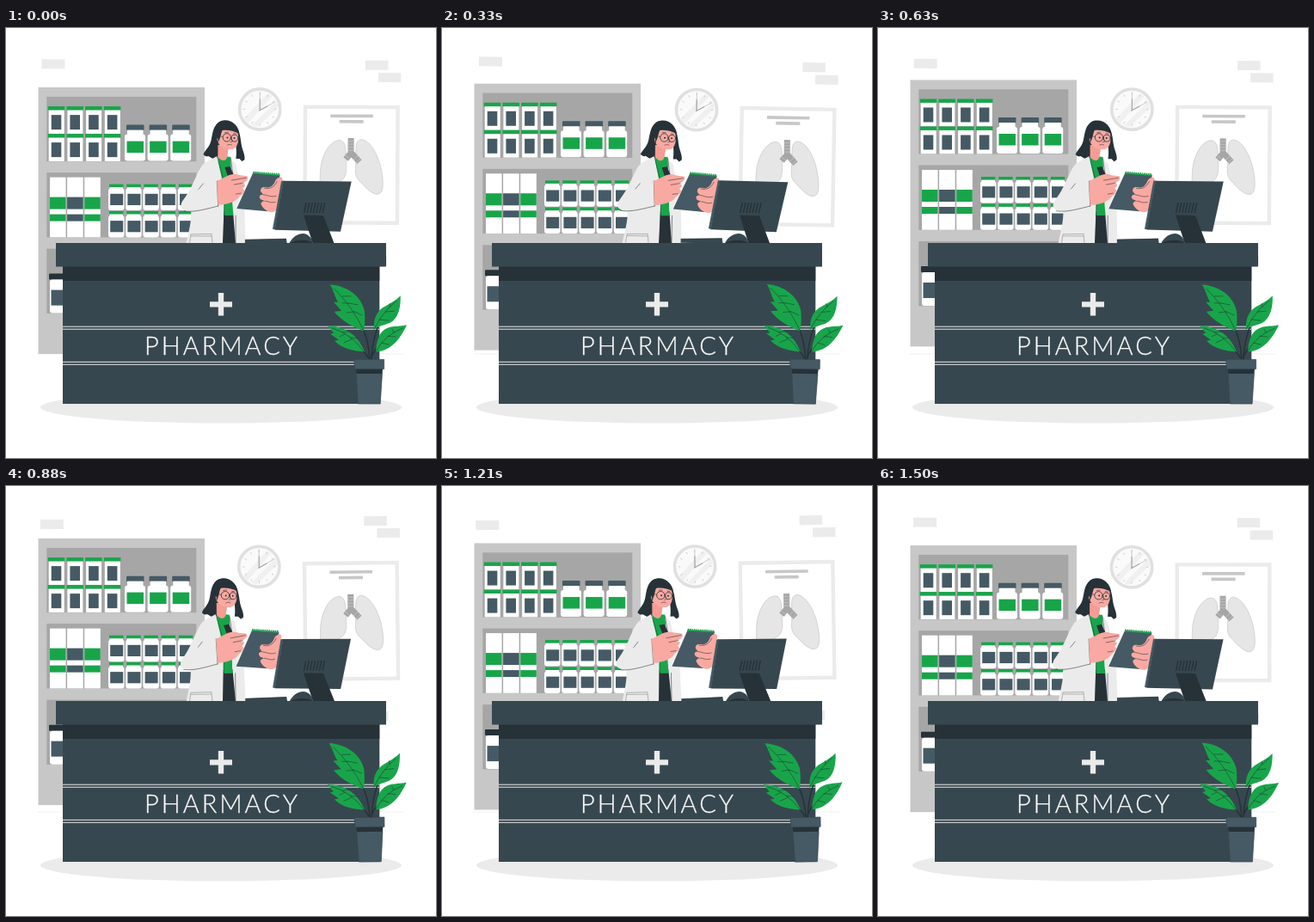
An HTML page that plays this animation: 500 by 500 pixels, repeating every 1.54 s.

```html
<!DOCTYPE html>
<html lang="en">
<head>
<meta charset="utf-8">
<title>Pharmacy counter</title>
<style>
html, body { margin: 0; width: 100%; height: 100%; overflow: hidden; background: #fff; }
svg { display: block; width: 100%; height: 100%; }
.line { fill: none; stroke: #263238; stroke-width: .8; stroke-linecap: round; stroke-linejoin: round; }
.thin { stroke-width: .55; }
.leaf { fill: #18a54a; }
.hair { fill: #263238; }
.skin { fill: #f9a9a1; }
.coat { fill: #ebebeb; }
</style>
</head>
<body>
<svg viewBox="0 0 500 500">
  <ellipse cx="250" cy="441" rx="210" ry="18.5" fill="#ebebeb"/>
  <path d="M37 379H462" stroke="#ebebeb" stroke-width=".7"/>

  <g id="wall">
    <g fill="#ebebeb">
      <rect x="41" y="37" width="27" height="11"/>
      <rect x="417.5" y="37" width="26.5" height="11"/>
      <rect x="432.5" y="51.3" width="26.5" height="11"/>
      <rect x="417" y="264" width="26.5" height="11"/>
    </g>
    <circle cx="295" cy="94.3" r="23.6" fill="#fafafa" stroke="#e0e0e0" stroke-width="3.6"/>
    <path d="M276 106L304 76L309 79L281 111ZM286 113L314 85L316 92L292 115Z" fill="#f0f0f0"/>
    <g id="ticks" stroke="#c7c7c7" stroke-width=".8"></g>
    <path d="M295 95.5V74M294 96L313 85.5" fill="none" stroke="#c7c7c7" stroke-width=".9"/>
    <path d="M295 96V82M294 96L304 90.5" fill="none" stroke="#a6a6a6" stroke-width="1.1"/>

    <rect x="347.7" y="91.3" width="107.6" height="134.6" fill="#fff" stroke="#ebebeb" stroke-width="4.4"/>
    <path d="M377 101.7H426.5M387.5 108.2H415.5" stroke="#c7c7c7" stroke-width="3.6"/>
    <g fill="#e6e6e6" stroke="#c7c7c7" stroke-width=".7">
      <path d="M388 130C376 130 366 149 365.5 168C365 183 365 193 371 191.500C378 189 381 181 388 178C396 175 396 166 395.500 155C395 143 396 131 388 130Z"/>
      <path d="M413 129C405 130 407 142 407 152C407 163 404 170 411 177C417 183 423 191 431 192.500C438 193 439 185 438 174C436 152 425 130 413 129Z"/>
    </g>
    <path d="M401 127.500V145L395 152M401 144L411 155" fill="none" stroke="#a6a6a6" stroke-width="7"/>
    <path d="M397 131H405M397 134.500H405M397 138H405M397 141.500H405M394 147L399 151M404 153L409 148M407 156L412 151" stroke="#c7c7c7" stroke-width=".8"/>
  </g>

  <g id="shelf"></g>

  <g id="woman">
    <path class="hair" d="M250 108C240 112 240 122 238 131C236 139 231 142 229 147C231 149 233 150 235 149L240 152L246 151L251 130ZM262 111C271 116 272 126 273 134C274 142 278 147 277 153L274 155L271 152L267 152C268 145 267 140 267 134Z"/>
    <path class="hair" d="M252 213H267L268 251H252Z"/>
    <path class="leaf" d="M246 148L261 150L264 218H254L247 177Z"/>
    <path d="M246 136H259L257 149C256 155 251 156 246 150Z" fill="#f59c94"/>
    <path class="skin" d="M247 117C256 114 266 117 269 122C271 131 269 139 263 141C254 142 247 138 245 130Z"/>
    <path class="hair" d="M246 129C240 118 243 109 252 107.500C262 106 270 114 271 123C264 119 256 118 251 119C249 124 249 128 246 134Z"/>
    <circle cx="256.300" cy="127.300" r="4.700" class="line"/>
    <circle cx="265.500" cy="128" r="4" class="line"/>
    <path d="M246 125L251.600 126.500M254 121.500L258 121M264 122.500L267 123M261.500 128L263 132L260.500 132.500M257 136C259 135 261 135 262 136" class="line thin"/>
    <circle cx="257" cy="127.500" r="1" class="hair"/>
    <circle cx="265" cy="128" r="1" class="hair"/>

    <path class="coat" d="M245 149L232 156C223 161 219 183 206 200C201 207 203 213 215 213C216 224 212 239 209.500 251H252L254 190Z"/>
    <path class="coat" d="M261 152L267 158L277 206L278.500 251H267L264 215Z"/>
    <path d="M245 149L254 182L253 250M261 152L265 181M267 218V250M229 181L221 191L246 178" class="line thin"/>
    <path d="M215 240L239 239.500L240 250M215 240L213.500 250M215 242H239" fill="none" stroke="#8a8a8a" stroke-width=".6"/>
    <path class="coat" d="M217 191L245 177L246.500 207C232 211 218 215 208 213Z"/>
    <path d="M207 213C219 215 234 210 246.500 207M245 178L246.500 207" class="line thin"/>

    <path class="skin" d="M296 184L315 174C319 171 323 174 320.500 180L322.500 188C323 196 320 211 311 213.500C304 214 299 210 296 206Z"/>
    <path d="M286 167L318 170L304.500 212.500L266.800 210Z" fill="#fafafa"/>
    <path d="M287 168L318.500 170.500L304.500 213L268 210Z" fill="#455a64"/>
    <path d="M287 168L318 170.300" stroke="#18a54a" stroke-width="3" stroke-dasharray="1.700 .7"/>
    <path class="skin" d="M313 177C317 171 323 173 320 180L322.500 188C323 198 319 212 310 213.500C304 214 299 210 297 206C295 203 298 201 301 201L296 199C293 196 295 193 299 193.500L296 190C295 186 298 184 302 185C307 186 311 183 313 177Z"/>
    <path d="M300 186C306 187 311 186 315 178M299 193.500C304 194 308 197 314 195M301 201C305 201 308 204 313 202" class="line thin"/>
    <path d="M254 162L260 161L266 174L259 176Z" class="hair"/>
    <path class="skin" d="M245 178L257 172C263 169 268 170 271 171L280 172C282 174 281 177 277 179L273 181C279 180 279 184 275 186L277 189C276 193 273 194 271 196C267 203 256 205 246.500 206Z"/>
    <path d="M262 177L279 174M265 182L276 180M267 193L273 192" class="line thin"/>
  </g>

  <g id="desk">
    <path d="M278 246.500L326 245L327 251H278Z" fill="#37474f"/>
    <path d="M278 246.500L326 245.300" stroke="#263238" stroke-width=".7"/>
    <path d="M329 251C333 243 339 239 346 239C353 240 356 245 357 251Z" fill="#37474f"/>
    <path d="M329 251C336 246 352 245 357 251Z" fill="#263238"/>
    <path d="M320 178L323 177.500L313 234.500L310 234Z" fill="#455a64"/>
    <path d="M322.500 177.800L401.500 178.300L389 236.500L312.500 234.800Z" fill="#37474f"/>
    <path d="M346 217.500L369 218L382 251H357Z" fill="#263238"/>
    <g id="vents" stroke="#263238" stroke-width="1.400"></g>
  </g>

  <rect x="66" y="270" width="368.300" height="167" fill="#37474f"/>
  <rect x="66" y="277" width="368.300" height="17" fill="#263238"/>
  <rect x="58" y="250" width="384" height="27.500" fill="#37474f"/>
  <path d="M66 347.200H434M66 350.200H434M66 388.300H434M66 391.300H434" stroke="#e8e8e8" stroke-width="1"/>
  <path d="M250 308V334.500M237 321.300H263" stroke="#ebebeb" stroke-width="6.300"/>
  <text x="161" y="380" font-family="Lato, sans-serif" font-weight="300" font-size="29" letter-spacing="3" fill="#fafafa" stroke="#fafafa" stroke-width=".3">PHARMACY</text>

  <g id="plant">
    <path d="M423 387C422 367 418 352 407 336M425 387C425 373 428 359 433 345M424 386C427 375 434 367 442 363M423 386C418 377 411 370 402 366" fill="none" stroke="#263238" stroke-width="1.500"/>
    <path class="leaf" d="M376.500 298.500C396 300 412 311 416.500 328C418 340 417 347 416 352.500C404 348 390 341 381.500 330L390 329L381 319L386 319C382 313 381 306 376.500 298.500Z"/>
    <path class="leaf" d="M458.500 311C459 325 456 338 446 343C438 346 432 347 428 350.500C427 339 430 331 438 325C446 320 453 317 458.500 311Z"/>
    <path class="leaf" d="M466 345C459 360 449 375 430 376.500C431 363 434 353 443 349C451 345.500 459 347 466 345Z"/>
    <path class="leaf" d="M374 346.500C391 347 408 354 417 376.500C405 376 390 373 382 364L387 363L377 356L381 355Z"/>
    <path class="line thin" d="M381 303Q402 323 416 352M391 312L401 312M398 320L409 322M405 330L414 334M398 320L391 320M405 330L396 331M454 317Q438 330 428 350M447 324L446 320M441 330L451 329M434 339L445 340M461 349Q440 357 430 376M451 354L449 350M444 358L453 359M437 366L445 368M379 349Q402 356 416 376M391 354L400 353M400 360L409 361M394 356L388 359M402 362L393 366"/>
    <path d="M407 396H438L435.500 437H409.500Z" fill="#455a64"/>
    <path d="M407 396H438L437.500 402H407.500Z" fill="#263238"/>
    <path d="M404.800 385.300H439.700V396.500H405.500Z" fill="#455a64"/>
    <path d="M404.800 385.300H439.700V396.500H405.500ZM407.500 402L409.500 437H435.500L437.500 402" fill="none" stroke="#37474f" stroke-width=".7"/>
  </g>
</svg>
<script>
const GREEN = '#18a54a', SLATE = '#455a64', WHITE = '#fff';
const byId = id => document.getElementById(id);
const rect = (x, y, w, h, fill, r = 0) =>
  `<rect x="${x}" y="${y}" width="${w}" height="${h}" rx="${r}" fill="${fill}"/>`;
const repeat = (n, draw) => Array.from({ length: n }, (_, i) => draw(i)).join('');

const box = (x, y) => rect(x + 1, y + 4, 18, 27.8, WHITE) +
  rect(x, y, 19.6, 4.4, GREEN) + rect(x + 4, y + 10, 11.6, 17, SLATE);

const bottle = x => rect(x + 2, 113, 20.5, 6.5, SLATE, 1) + rect(x + 3, 119, 18.5, 8, WHITE) +
  rect(x, 124, 24, 31, WHITE, 3) + rect(x + 2.5, 132, 19.5, 13.5, GREEN);

const tallBox = (x, band) => rect(x, 174, 18.6, 69.7, WHITE) +
  rect(x, 197, 18.6, 14, band) + rect(x, 217, 18.6, 8, band);

const jar = (x, y) => rect(x + 1.5, y + 3, 15.5, 5, WHITE) + rect(x, y + 5, 18.5, 25.5, WHITE, 3) +
  rect(x + 1, y, 16.5, 3.6, GREEN) + rect(x + 2.2, y + 11.2, 15, 13.2, SLATE);

byId('shelf').innerHTML =
  rect(37.5, 69.4, 193.5, 310, '#c7c7c7') +
  [80.3, 168.5, 257].map(y => rect(47.3, y, 174, 75.3, '#a6a6a6')).join('') +
  repeat(8, i => box(48.7 + i % 4 * 21.7, i < 4 ? 91.5 : 123.5)) +
  repeat(3, i => bottle(138 + i * 26.6)) +
  repeat(3, i => tallBox(51 + i * 20.1, i === 1 ? SLATE : GREEN)) +
  repeat(10, i => jar(119 + i % 5 * 20.2, i < 5 ? 182 : 213.3)) +
  rect(50, 286, 24, 7, '#263238', 1) + rect(51, 293, 25, 39, WHITE, 3) +
  rect(52.5, 305, 24, 18, SLATE);

byId('ticks').innerHTML = repeat(12, i =>
  `<path d="M295 75V77.500" transform="rotate(${i * 30} 295 94.3)"/>`);
byId('vents').innerHTML = repeat(7, i => `<path d="M${349 + i * 3.6} 203l-2.500 12"/>`);

const LOOP = 1540;
const wave = (time, peak) => Math.cos((time - peak) / LOOP * 2 * Math.PI);
const pivots = { wall: [250, 155], woman: [245, 250], desk: [350, 225], plant: [420, 368] };

function draw(now) {
  const time = now % LOOP;
  const angle = wave(time, 330);
  for (const [id, [x, y]] of Object.entries(pivots))
    byId(id).setAttribute('transform', `rotate(${angle} ${x} ${y})`);
  byId('shelf').setAttribute('transform', `translate(0 ${4.5 * wave(time, -50) - 4.8})`);
}

const start = performance.now();
function tick() {
  draw(performance.now() - start);
  requestAnimationFrame(tick);
}
tick();
</script>
</body>
</html>
```
